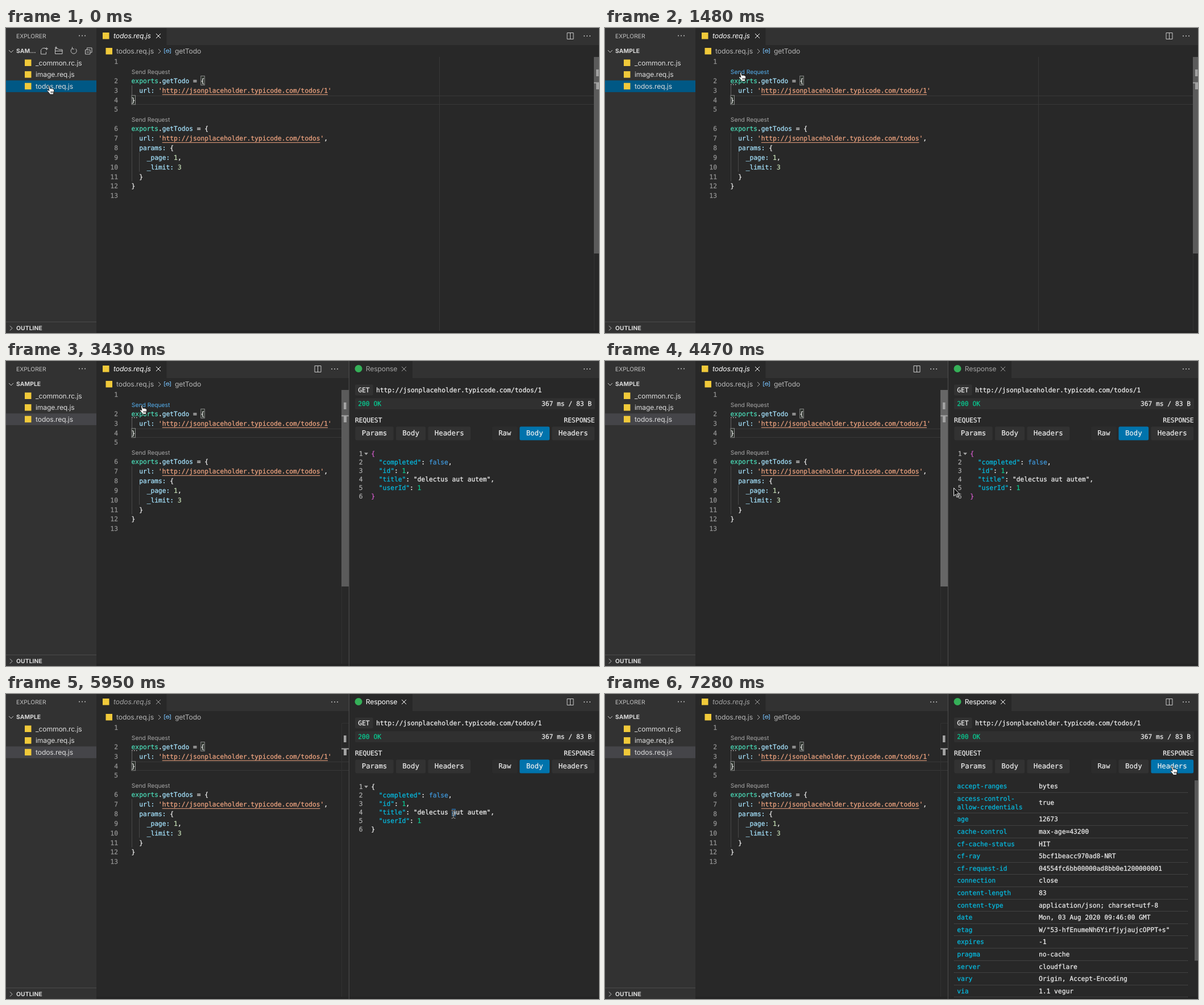
An HTML page for the animation above (8 s loop, 1043 by 537 pixels).

```html
<!DOCTYPE html>
<html lang="en">
<head>
<meta charset="utf-8">
<title>Editor request demo</title>
<style>
  html, body { margin: 0; width: 100%; height: 100%; overflow: hidden; background: #282828; }
  svg { display: block; width: 100%; height: 100%; }
  text { white-space: pre; text-rendering: geometricPrecision; stroke-width: 0; }
  .ui { font: 12.19px Inter, sans-serif; letter-spacing: -.15px; }
  .small { font: 10.3px Inter, sans-serif; }
  .bold { font-weight: 700; letter-spacing: .1px; }
  .italic { font-style: italic; }
  .mono { font: 11.25px "DejaVu Sans Mono", monospace; stroke-width: .25px; }
  .label { font: 12.3px "DejaVu Sans Mono", monospace; text-anchor: middle; stroke-width: .2px; }
  .end { text-anchor: end; }
  .line { fill: none; stroke: #c8c8c8; stroke-width: 1; }
</style>
</head>
<body>
<svg id="stage" viewBox="0 0 1043 537"></svg>
<script>
const LOOP = 8000;
const CHAR = 6.773;          // advance of the monospaced font
const SPLIT = 2230, ANSWER = 2980, REFOCUS = 4770, TABLE = 7280;

const colors = {
  w: '#f0f0f0', t: '#4bdcb8', b: '#a6e4ff', s: '#f0a580', n: '#c6dfb6',
  k: '#05bce2', f: '#3f98dc', g: '#08cb92', m: '#d45ccd'
};

// drawing helpers
const rect = (x, y, w, h, fill, extra = '') =>
  `<rect x="${x}" y="${y}" width="${w}" height="${h}" fill="${fill}" ${extra}/>`;
const path = (d, stroke = '#c8c8c8', extra = '') =>
  `<path class="line" d="${d}" style="stroke:${stroke}" ${extra}/>`;
const paint = color => `fill="${color}" stroke="${color}"`;
const text = (x, y, str, cls, color = colors.w) =>
  `<text x="${x}" y="${y}" class="${cls}" ${paint(color)}>${str}</text>`;
const on = (spans, ...parts) => `<g data-on="${spans}">${parts.join('')}</g>`;
const move = (x, y, ...parts) => `<g transform="translate(${x} ${y})">${parts.join('')}</g>`;

// tokens are separated by "|" and start with a colour key
const tokens = (x, y, source) => `<text x="${x}" y="${y}" class="mono">` +
  source.split('|').map(t => `<tspan ${paint(colors[t[0]])}>${t.slice(1)}</tspan>`).join('') + '</text>';

const fileIcon = (x, y) => rect(x, y, 11.5, 11.5, '#f0c93a');
const dots = (x, y) => [-5, 0, 5].map(d => rect(x + d - .8, y - .8, 1.7, 1.7, '#c8c8c8')).join('');
const close = (x, fill) => path(`M${x - 4} 10l8 8m0 -8l-8 8`, fill, 'stroke-width="1.2"');
const splitIcon = x => path(`M${x - 5.5} 8.5h11v11h-11zM${x} 8.5v11`);

function sidebar() {
  const files = ['_common.rc.js', 'image.req.js', 'todos.req.js'];
  const headIcons =
    path('M70 35.5h-5.5l-3 3v7.5h9v-4M69 36.5h5m-2.5 -2.5v5') +
    path('M94 45.5h-7.5v-9h5l1.5 1.5h6v7.5h-5M86.5 40.5h13M86 34.5h4m-2 -2v4') +
    path('M122.5 36.5a5 5 0 1 1 -6 -.5M116.5 33.5v3.5h3.5') +
    path('M142.5 38.5v-3.5h8.5v8h-3M139.5 38.5h8.5v7.5h-8.5zM141.5 42.3h4.5');
  return rect(0, 0, 159, 537, '#323232') +
    on(`0-${SPLIT}`, rect(0, 92.3, 159, 20.6, '#005885')) +
    on(`${SPLIT}-${LOOP}`, rect(0, 92.3, 159, 20.6, '#454549')) +
    text(18, 17.9, 'EXPLORER', 'small', '#c4c4c4') + dots(134, 13.5) +
    path('M5 39l4 4 4 -4') +
    on('0-1025', text(18, 44.3, 'SAM…', 'small bold', '#dadada'), headIcons) +
    on(`1025-${LOOP}`, text(18, 44.3, 'SAMPLE', 'small bold', '#dadada')) +
    files.map((name, i) =>
      fileIcon(33, 55.5 + 20.6 * i) + text(52, 65.8 + 20.6 * i, name, 'ui', '#dcdcdc')).join('') +
    path('M0 517.5H159', '#4c4c4c') +
    path('M7 524.5l4 4 -4 4') + text(18, 532.1, 'OUTLINE', 'small bold', '#dadada');
}

function tabBar() {
  const focused = `0-${SPLIT},${ANSWER}-${REFOCUS}`;
  const blurred = `${SPLIT}-${ANSWER},${REFOCUS}-${LOOP}`;
  const title = fill => text(189, 18.4, 'todos.req.js', 'ui italic', fill) + close(268, fill);
  return rect(159, 0, 884, 30, '#323232') + rect(159, 0, 123.5, 30, '#282828') +
    fileIcon(170, 8) + on(focused, title('#fff')) + on(blurred, title('#a2a2a2')) +
    on(`0-${SPLIT}`, splitIcon(992.5), dots(1022, 14)) +
    on(`${SPLIT}-${LOOP}`, dots(578, 14)) +
    on(`${ANSWER}-${REFOCUS}`, splitIcon(548.5)) +
    fileIcon(175.5, 35) + text(194, 45.2, 'todos.req.js', 'ui', '#b4b4b4') +
    path('M268 37l4 4 -4 4', '#b4b4b4') +
    path('M280.5 36.5h-2v8h2M287.5 36.5h2v8h-2M281.5 39.5l3 -1.5 2.5 1.5v2.5l-3 1.5 -2.5 -1.5zM281.5 39.5l2.5 1.2 3 -1.2', '#72b8ee') +
    text(297, 45.2, 'getTodo', 'ui', '#b4b4b4');
}

// right edge of the editor: overview lane, slider and markers
function overview() {
  const slider = (spans, fill) => on(spans, rect(590, 51, 13, 346, fill));
  return path('M603 51.5H590.5V533', '#323232') +
    slider('0-4325', '#5b5b5b') + slider('4325-4900', '#666') +
    slider('4900-5055', '#4b4b4b') + slider('5055-5210', '#363636') +
    rect(594, 73, 4.5, 12, '#a2a2a2') +
    rect(590, 95.5, 13, 2, '#a2a2a2') + rect(594, 97, 5, 11, '#a2a2a2');
}

function editor() {
  const left = 220.6, base = 63.1, pitch = 16.875;
  const site = 'http://jsonplaceholder.typicode.com/todos';
  const rows = [
    '', null, 'texports|w.|bgetTodo|w = {', `b  url:|s '${site}/1'`, 'w}', '', null,
    'texports|w.|bgetTodos|w = {', `b  url:|s '${site}'|w,`, 'b  params:|w {',
    'b    _page:|n 1|w,', 'b    _limit:|n 3', 'w  }', 'w}', ''
  ];
  let number = 0, out = '';
  rows.forEach((row, i) => {
    if (row === null) return;
    const y = base + pitch * i;
    out += text(197, y, ++number, 'mono end', '#949494') + (row && tokens(left, y, row));
  });
  const underline = (y, chars) => rect(left + 8 * CHAR, y, chars * CHAR, 1, colors.s);
  const box = (x, y) => rect(x, y, 6.5, 16, '#2a302a', 'stroke="#8a8a8a"');
  const lens = (y, fill) => text(220.8, y, 'Send Request', 'small', fill);
  return rect(159, 30, 884, 507, '#282828') + tabBar() +
    path('M762.5 51V533', '#373737') +
    path('M221 119.5H1034M221 134.5H1034', '#393939') +
    path('M221.5 101V118', '#666') + path('M221.5 185V270M234.5 219V253', '#484848') +
    box(342.8, 84.5) + box(221, 118.7) + out +
    underline(116.7, 43) + underline(201.2, 41) +
    on(`0-1315,4180-${LOOP}`, lens(80.7, '#a6a6a6')) + on('1315-4180', lens(80.7, '#55b0f0')) +
    lens(165.1, '#a6a6a6') +
    on(`150-${LOOP}`, ...[221, 225, 229].map(x => rect(x, 98.8, 1.5, 1.5, '#c8c8c8'))) +
    on(`${ANSWER}-3430,3880-4325`, rect(226.7, 118.5, 1.5, 16.5, '#c4c4c4')) +
    rect(159, 533, 884, 4, '#242424') +
    on(`0-${SPLIT}`, move(444, 0, overview())) + on(`${SPLIT}-${LOOP}`, overview());
}

function selections() {
  const blue = '#2a618f', right = 1043;
  const row = (i, from, to) => rect(from, 155.8 + 15 * i, to - from, 15.1, blue);
  const rest = [2, 3, 4].map(i => row(i, 642, right)).join('') + row(5, 642, 649);
  return on('4910-5055', row(3, 649, right), row(4, 642, right), row(5, 642, 649)) +
    on('5055-5790', row(1, 649, right), rest) +
    on('5935-6400', rect(784, 202, 7, 13.5, blue));
}

function jsonBody() {
  const left = 642.3, base = 167, pitch = 15;
  const fields = ['k"completed"|w: |ffalse|w,', 'k"id"|w: |g1|w,',
    'k"title"|w: |w"delectus aut autem"|w,', 'k"userId"|w: |g1'];
  const braces = c => tokens(left, base, c + '{') + tokens(left, base + 5 * pitch, c + '}');
  return selections() +
    [1, 2, 3, 4, 5, 6].map((n, i) => text(627.5, base + pitch * i, n, 'mono end', '#acacac')).join('') +
    on(`3430-${TABLE}`, '<path d="M630 161.5h7l-3.5 4z" fill="#a8a8a8"/>') +
    fields.map((f, i) => tokens(left + 2 * CHAR, base + pitch * (i + 1), f)).join('') +
    on(`${ANSWER}-${REFOCUS}`, braces('m')) + on(`${REFOCUS}-${TABLE}`, braces('w'));
}

function headerTable() {
  const entries = [
    ['accept-ranges', 'bytes'], ['access-control-/allow-credentials', 'true'],
    ['age', '12673'], ['cache-control', 'max-age=43200'], ['cf-cache-status', 'HIT'],
    ['cf-ray', '5bcf1beacc970ad8-NRT'], ['cf-request-id', '04554fc6bb00000ad8bb0e1200000001'],
    ['connection', 'close'], ['content-length', '83'],
    ['content-type', 'application/json; charset=utf-8'],
    ['date', 'Mon, 03 Aug 2020 09:46:00 GMT'], ['etag', 'W/"53-hfEnumeNh6YirfjyjaujcOPPT+s"'],
    ['expires', '-1'], ['pragma', 'no-cache'], ['server', 'cloudflare'],
    ['vary', 'Origin, Accept-Encoding'], ['via', '1.1 vegur']
  ];
  let y = 151.7, out = '';
  for (const [key, value] of entries) {
    const lines = key.split('/');
    const height = 21.6 + 15 * (lines.length - 1), middle = y + height / 2 + 3.7;
    lines.forEach((l, i) => {
      out += text(619.3, middle + 14.7 * (i - (lines.length - 1) / 2), l, 'mono', colors.k);
    });
    out += text(763, middle, value, 'mono');
    y += height;
    out += path(`M614 ${Math.floor(y) + .5}H1026`, '#5a5a5a', 'stroke-dasharray="1 1"');
  }
  return out + rect(1037, 152, 6, 317.5, '#595959');
}

function button(x, w, label, fill = '#323232') {
  return rect(x + .4, 115.4, w - .8, 24.2, fill, 'rx="2.5"') + text(x + w / 2, 131.3, label, 'label');
}

function responsePanel() {
  const blue = '#0073ac', plain = '#323232';
  const title = fill => text(632.7, 18.4, 'Response', 'ui', fill) + close(700, fill);
  const focused = `${SPLIT}-${ANSWER},${REFOCUS}-${LOOP}`;
  const answer = rect(614, 41.5, 31.5, 19, plain, 'rx="2"') + text(619.3, 55.2, 'GET', 'mono') +
    text(651, 55.2, 'http://jsonplaceholder.typicode.com/todos/1', 'mono') +
    rect(614, 65.5, 422, 19.5, '#303030', 'rx="2"') +
    text(619.3, 78.7, '200 OK', 'mono', colors.g) + text(1030, 78.7, '367 ms / 83 B', 'mono end') +
    text(614, 107.8, 'REQUEST', 'mono') + text(1035.5, 107.8, 'RESPONSE', 'mono end') +
    button(614, 68, 'Params') + button(685.5, 53, 'Body') + button(742, 75.5, 'Headers') +
    button(854.5, 45.5, 'Raw', '#2c2c2c') +
    on(`${ANSWER}-${TABLE}`, button(903, 53.5, 'Body', blue), button(960, 75.5, 'Headers'), jsonBody()) +
    on(`${TABLE}-${LOOP}`, button(903, 53.5, 'Body'), button(960, 75.5, 'Headers', blue), headerTable());
  return on(`${SPLIT}-${LOOP}`,
    rect(603, 0, 440, 537, '#282828'), rect(603, 0, 440, 30, '#323232'),
    rect(604, 0, 111, 30, '#282828'), rect(603, 533, 440, 4, '#242424'),
    rect(602.8, 0, 1, 537, '#505050'),
    on(`2380-${LOOP}`, '<circle cx="620" cy="13.5" r="6.5" fill="#35b058"/>'),
    on(focused, title('#fff'), splitIcon(992.5)), on(`${ANSWER}-${REFOCUS}`, title('#a2a2a2')),
    dots(1022, 14),
    on(`2680-${ANSWER}`, text(613.7, 52.3, 'Waiting for response ...', 'mono')),
    on(`${ANSWER}-${LOOP}`, answer));
}

const beamPath = 'M-3.5-7q3 0 3.5 1.5.5-1.5 3.5-1.5M0-5.5v11M-3.5 7q3 0 3.5-1.5.5 1.5 3.5 1.5M-2 1.5h4';
const pointers = {
  hand: '<path d="M-4.8-7q1.5-1.2 2.3.6l1.3 4.3 1.3-.5 1.2.6 1.3-.3 1 .8q1.7 0 2 1.5l.2 3.3-1.2 2.2v2.4h-6.4l-.5-1.5-4.3-4.9q.1-1.7 1.9-1.1l1.7 1.2z" fill="#fff" stroke="#111" stroke-width=".9"/>' +
    path('M.2 2.5v3m2-3v3m2-3v3', '#111', 'stroke-width=".8"'),
  arrow: '<path d="M-3.5-8.5v14.2l3.2-3 2.2 5.2 2.2-1-2.2-5h4.5z" fill="#111" stroke="#f4f4f4"/>',
  beam: `<path d="${beamPath}" fill="none" stroke="#222" stroke-width="2.6"/>` + path(beamPath, '#b8b8b8')
};
const pointerSpans = {
  hand: `0-1025,1315-4180,7135-${LOOP}`,
  arrow: '1025-1170,4180-4770',
  beam: '1170-1315,4770-7135'
};

const stage = document.getElementById('stage');
stage.innerHTML = editor() + sidebar() + responsePanel() + '<g id="pointer">' +
  Object.keys(pointers).map(k => on(pointerSpans[k], pointers[k])).join('') + '</g>';

const pointer = document.getElementById('pointer');
const timed = [...stage.querySelectorAll('[data-on]')].map(node => ({
  node, spans: node.dataset.on.split(',').map(s => s.split('-').map(Number))
}));

// each move: start, number of steps, destination
const STEP = 145;
const moves = [
  [590, 7, 242, 85.5], [4180, 3, 617, 232], [4620, 2, 650, 240], [4910, 2, 641, 164],
  [5210, 1, 639, 153], [5500, 4, 787, 212], [6100, 1, 789, 212], [6400, 1, 791, 213],
  [6700, 5, 1001, 134.5]
];

function pointerAt(t) {
  let x = 79, y = 109;
  for (const [start, steps, toX, toY] of moves) {
    if (t < start) break;
    const p = Math.min(1, (Math.floor((t - start) / STEP) + 1) / steps);
    const eased = p * p * (3 - 2 * p);
    x += (toX - x) * eased;
    y += (toY - y) * eased;
  }
  return `translate(${x.toFixed(1)} ${y.toFixed(1)})`;
}

function draw(now) {
  const t = now % LOOP;
  for (const { node, spans } of timed) {
    const shown = spans.some(([from, to]) => t >= from && t < to);
    node.style.display = shown ? '' : 'none';
  }
  pointer.setAttribute('transform', pointerAt(t));
}

const begin = performance.now();
function tick() {
  draw(performance.now() - begin);
  requestAnimationFrame(tick);
}
tick();
</script>
</body>
</html>
```
